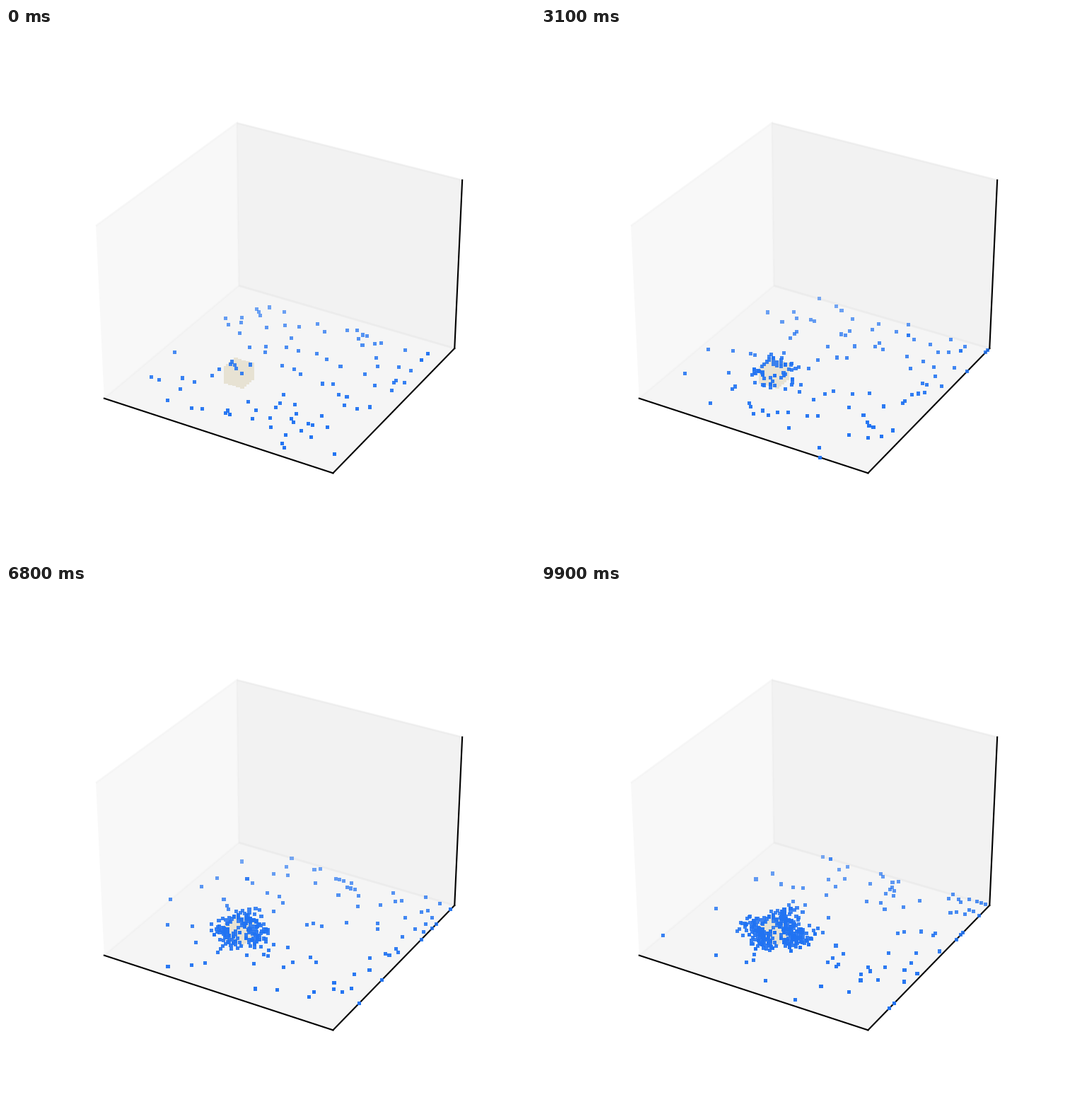
A matplotlib script for the animation above (10000 ms loop, 748 by 748 pixels).

```python
import numpy as np
import matplotlib.pyplot as plt
from matplotlib.animation import FuncAnimation

FRAMES, STEP_MS = 100, 100
GRID, HEIGHT = 55, 50
CENTER = np.array([20.8, 20.5])
BLUE, SAND = (0.13, 0.45, 0.95), "#e7e2d3"
DIRS = np.array([[1, 0], [0, 1], [0, -1], [-1, 0]])
SIZE = 3.8

rng = np.random.default_rng(12)


def walk(count=98):
    """Random walkers on the floor; those reaching the mound are absorbed."""
    pos = rng.integers(3, GRID - 2, (count, 2)).astype(float)
    alive = np.ones(count, bool)
    path = []
    for f in range(FRAMES):
        path.append(np.round(pos[alive]))
        move = rng.integers(-1, 2, pos.shape) + 0.05
        at_edge = ((pos <= 0) | (pos >= GRID)).any(axis=1)
        move[at_edge & (rng.random(count) < 0.6)] = 0
        pos = np.clip(pos + move, 0, GRID)
        reach = 3.5 + 5 * f / FRAMES
        alive &= np.hypot(*(pos - CENTER).T) > reach
    return path


def mound(count=330):
    """Pieces in order of arrival, piled outward from the block's four faces."""
    age = np.arange(count) / count
    side = rng.choice(4, count, p=[0.33, 0.29, 0.22, 0.16])
    reach = (3 + 7 * age ** 0.6) * np.array([1, 0.93, 0.8, 0.82])[side]
    out = 2.6 + (reach - 2.6) * rng.random(count)
    stray = rng.random(count) < 0.05
    out[stray] *= rng.uniform(1.5, 2.1, stray.sum())
    across = np.clip(rng.normal(0, 1.5, count), -3, 3)
    z = rng.integers(0, 5, count)
    z[stray] = 0
    d = DIRS[side]
    xy = CENTER + np.round(out)[:, None] * d + np.round(across)[:, None] * d[:, ::-1]
    return np.column_stack([xy, z])


def shade(p):
    """Blue that pales with distance from the viewer."""
    near, far = 0.433 * GRID, -0.75 * GRID
    t = (near - 0.433 * p[:, 0] + 0.75 * p[:, 1]) / (near - far)
    rgba = np.empty((len(p), 4))
    rgba[:, :3] = BLUE
    rgba[:, 3] = 1 - (0.7 * np.clip(t, 0, 1)) ** 2
    return rgba


def dots(p, color, z):
    return ax.scatter(*p.T, s=SIZE, c=color, marker="s", linewidths=0,
                      depthshade=False, zorder=z)


walkers, pieces = walk(), mound()

fig = plt.figure(figsize=(4, 4), dpi=187)
ax = fig.add_subplot(projection="3d", computed_zorder=False)
ax.set(xlim=(0, GRID), ylim=(0, GRID), zlim=(0, HEIGHT),
       xticks=[], yticks=[], zticks=[])

cube = np.stack(np.meshgrid(*[np.arange(5)] * 3), -1).reshape(-1, 3)
dots(cube + [*(CENTER - 2), 0], SAND, 1)
shown = []


def draw(f):
    while shown:
        shown.pop().remove()
    free = walkers[f]
    built = pieces[:int(3 + 327 * (f / (FRAMES - 1)) ** 1.55)]
    p = np.vstack([np.column_stack([free, np.zeros(len(free))]), built])
    shown.append(dots(p, shade(p), 2))
    return shown


anim = FuncAnimation(fig, draw, frames=FRAMES, interval=STEP_MS,
                     init_func=lambda: draw(0), repeat=True, repeat_delay=0)
plt.show()
```
